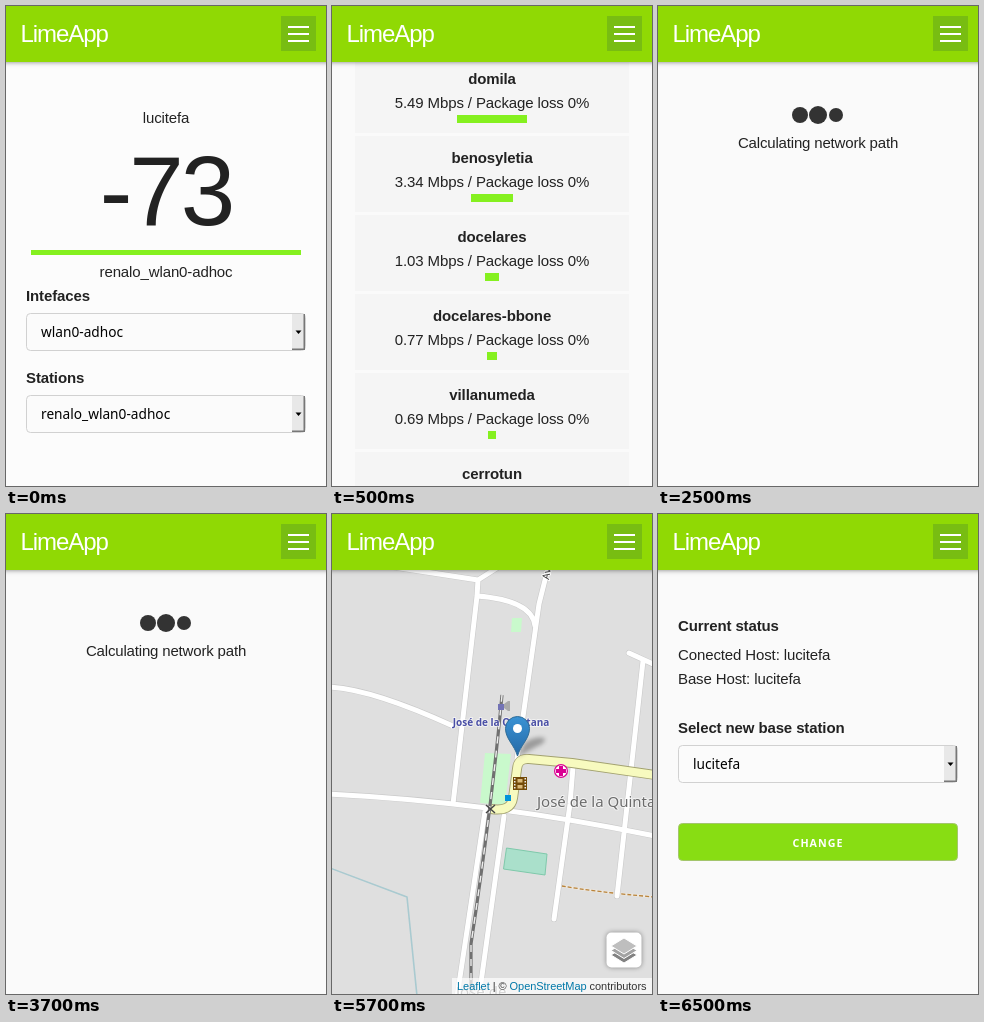
Animation, 320 px wide and 480 px high, one loop 8000 ms. Source, as an HTML page with a canvas:

```html
<!DOCTYPE html>
<html lang="en">
<head>
<meta charset="utf-8">
<title>LimeApp</title>
<style>
html, body { margin: 0; width: 100%; height: 100%; overflow: hidden; background: #fafafa; }
canvas { display: block; width: 320px; height: 480px; }
</style>
</head>
<body>
<canvas id="stage"></canvas>
<script>
const W = 320, H = 480, LOOP = 8000, MID = W / 2;
const SANS = '"Liberation Sans", Arial, sans-serif';
const NOTO = '"Noto Sans", "Open Sans", sans-serif';
const LIME = '#90d904', BAR = '#85f01f', INK = '#222', PINK = '#da0092';
const HOST = 'lucitefa', STATION = 'renalo_wlan0-adhoc';

const canvas = document.getElementById('stage');
const ctx = canvas.getContext('2d');
const dpr = window.devicePixelRatio || 1;
canvas.width = W * dpr;
canvas.height = H * dpr;

function rect(x, y, w, h, fill) {
  ctx.fillStyle = fill;
  ctx.fillRect(x, y, w, h);
}

function disc(x, y, r, fill) {
  ctx.fillStyle = fill;
  ctx.beginPath();
  ctx.arc(x, y, r, 0, 7);
  ctx.fill();
}

function fill(d, color, border) {
  const path = new Path2D(d);
  ctx.fillStyle = color;
  ctx.fill(path);
  if (border) stroke(d, 1, border);
}

function stroke(d, width, color, dash = []) {
  ctx.lineWidth = width;
  ctx.strokeStyle = color;
  ctx.lineJoin = 'round';
  ctx.setLineDash(dash);
  ctx.stroke(new Path2D(d));
  ctx.setLineDash([]);
}

function box(x, y, w, h, r, color, border) {
  ctx.beginPath();
  ctx.roundRect(x + .5, y + .5, w - 1, h - 1, r);
  ctx.fillStyle = color;
  ctx.fill();
  if (border) {
    ctx.lineWidth = 1;
    ctx.strokeStyle = border;
    ctx.stroke();
  }
}

function text(str, x, y, { font = '15px ' + SANS, color = INK, align = 'left', gap = -.12, halo } = {}) {
  ctx.font = font;
  ctx.textAlign = align;
  ctx.letterSpacing = gap + 'px';
  if (halo) {
    ctx.lineWidth = 2;
    ctx.lineJoin = 'round';
    ctx.strokeStyle = halo;
    ctx.strokeText(str, x, y);
  }
  ctx.fillStyle = color;
  ctx.fillText(str, x, y);
  return ctx.measureText(str).width;
}

const center = (str, y, style) => text(str, MID, y, { align: 'center', ...style });
const bold = { font: 'bold 15px ' + SANS };

function shadowed(color, blur, draw) {
  ctx.save();
  ctx.shadowColor = color;
  ctx.shadowBlur = blur * dpr;
  draw();
  ctx.restore();
}

function header() {
  shadowed('rgba(0,0,0,.5)', 5, () => rect(-10, -10, W + 20, 66, LIME));
  text('LimeApp', 14.6, 36, { font: '24px ' + SANS, color: '#fff', gap: -1.1 });
  rect(275, 10, 35, 35, '#78bd12');
  for (let i = 0; i < 3; i++) rect(282, 20 + i * 7, 21, 2, '#fff');
}

function select(y, value) {
  box(20, y, 280, 38, 4, '#fbfbfb', '#d1d1d1');
  text(value, 35, y + 24, { font: '13.7px ' + NOTO, color: '#000', gap: 0 });
  rect(286, y + 1, 13, 36, '#777');
  rect(286, y + 1, 11.5, 34.5, '#e8e8e8');
  fill(`M289.5 ${y + 17.5}h6l-3 3.5z`, '#000');
}

function signal() {
  rect(0, 0, W, H, '#fcfcfc');
  center(HOST, 117);
  center('-73', 219, { font: '98px ' + SANS, gap: -3 });
  rect(25, 244, 270, 5, BAR);
  center(STATION, 271);
  text('Intefaces', 20, 295, bold);
  select(307, 'wlan0-adhoc');
  text('Stations', 20, 377, bold);
  select(389, STATION);
}

const speeds = {
  domila: 5.49, benosyletia: 3.34, docelares: 1.03,
  'docelares-bbone': .77, villanumeda: .69, cerrotun: .6
};

function metrics() {
  rect(0, 0, W, H, '#fafafa');
  Object.entries(speeds).forEach(([name, mbps], i) => {
    const y = 51 + i * 79, half = Math.round(mbps * 6.4);
    rect(23, y, 274, 76, '#f5f5f5');
    center(name, y + 27, bold);
    center(mbps.toFixed(2) + ' Mbps / Package loss 0%', y + 51);
    rect(MID - half, y + 58, half * 2, 8, BAR);
  });
}

function loading() {
  rect(0, 0, W, H, '#fafafa');
  [8, 9, 7].forEach((r, i) => disc(142 + i * 18, 109, r, '#333'));
  center('Calculating network path', 142, { gap: -.17 });
}

const streets =
  'M55 52L146 66L168 52 M146 66L145 82L121 290 M145 82Q200 86 203 112 ' +
  'M217 50L207 90L185 245 M-3 173Q40 175 121 212 M-3 280Q160 288 323 322 ' +
  'M297 139L323 151 M311 147L303 220L285 382 M241 253L238 290L222 405 ' +
  'M172 302L147 483 M153 297L125 483';
const avenue = 'M323 261L240 249L197 245Q186 244 185 255L181 284Q179 298 159 295';
const rail = 'M170 181Q160 290 139 430V482';
const track = 'M230 372Q265 378 322 383';

function pin(x, y) {
  ctx.save();
  ctx.translate(x, y);
  ctx.save();
  ctx.transform(1, 0, -.7, .6, 0, 0);
  ctx.filter = 'blur(2px)';
  fill('M0 0L-7 -18A9 9 0 1 1 7 -18z', 'rgba(0,0,0,.3)');
  ctx.restore();
  const blue = ctx.createLinearGradient(0, -41, 0, 0);
  blue.addColorStop(0, '#3a93d5');
  blue.addColorStop(1, '#2468a5');
  fill('M0 -1C-3 -12 -12 -18 -12 -28.5A12 12 0 0 1 12 -28.5C12 -18 3 -12 0 -1z', blue, '#2e6c97');
  disc(0, -28.5, 4.5, '#fff');
  ctx.restore();
}

function mapIcons() {
  rect(166, 190, 6, 6, '#7373b5');
  fill('M172 190l4 -3h2v10h-2l-4 -3z', '#aaa');
  rect(173, 281, 6, 6, '#0092da');
  stroke('M154 291l9 8m-9 0l9 -8', 1.5, '#444');

  disc(229, 257, 7, PINK);
  disc(229, 257, 5.8, '#fff');
  rect(227, 252, 4, 10, PINK);
  rect(224, 255, 10, 4, PINK);

  rect(181, 263, 14, 13, '#734a08');
  for (let y = 264; y < 275; y += 3) {
    rect(182, y, 1.5, 1.5, '#eee');
    rect(192.5, y, 1.5, 1.5, '#eee');
  }
  for (const y of [265, 271]) rect(185.5, y, 5, 3.5, '#d9b878');
}

function layersControl() {
  shadowed('rgba(0,0,0,.4)', 5, () => box(274, 418, 36, 36, 5, '#fff'));
  ['#828282', '#a2a2a2', '#bebebe'].forEach((shade, i) =>
    fill(`M292 ${433 - i * 4.5}l13 8l-13 8l-13 -8z`, shade, '#fff'));
}

function attribution() {
  rect(120, 464, 200, 16, 'rgba(255,255,255,.7)');
  let x = 125;
  ['Leaflet', ' | © ', 'OpenStreetMap', ' contributors'].forEach((str, i) => {
    x += text(str, x, 476, { font: '11px ' + SANS, color: i % 2 ? '#333' : '#0078a8', gap: -.05 });
  });
}

function map() {
  rect(0, 0, W, H, '#dfdfdf');
  stroke('M-2 354L75 383L85 482', 1.6, '#a9cad0');
  fill('M153 239L179 240L173 291L148 289z', '#c9f9cc');
  fill('M180 104h10l-1 14h-10z', '#c9f9cc');
  fill('M174.5 334l40.5 6l-2 21l-41.5 -6z', '#aae0cb', '#7fc9ab');
  stroke(track, 2.5, '#ece7df');
  stroke(track, 1.3, '#b9833a', [4, 2]);

  ctx.lineCap = 'round';
  stroke(streets, 6.2, '#cacaca');
  stroke(streets, 5, '#fff');
  ctx.lineCap = 'butt';
  stroke(avenue, 10, '#a3a270');
  stroke(avenue, 8.2, '#f7fabf');
  stroke(rail, 3.2, '#707070');
  stroke(rail, 1.4, '#eee', [7, 7]);

  ctx.save();
  ctx.translate(217, 66);
  ctx.rotate(-1.4);
  text('Av', 0, 0, { font: '10px ' + NOTO, color: '#333', halo: '#fff' });
  ctx.restore();

  mapIcons();
  const town = 'José de la Quintana', haze = 'rgba(255,255,255,.6)';
  const place = { font: '15px ' + NOTO, color: '#6b6b6b', halo: haze, gap: 0 };
  text(town, 169, 212, { font: 'bold 10px ' + NOTO, color: '#4a4fa6', align: 'center', halo: haze, gap: 0 });
  text(town, 205, 293, place);
  text('José de', 124, 483, place);

  pin(185.5, 243);
  layersControl();
  attribution();
}

function settings() {
  rect(0, 0, W, H, '#fafafa');
  text('Current status', 20, 117, bold);
  text('Conected Host: ' + HOST, 20, 146);
  text('Base Host: ' + HOST, 20, 170);
  text('Select new base station', 20, 219, bold);
  select(231, HOST);
  box(20, 309, 280, 38, 4, '#88dd13', '#a3c56c');
  center('CHANGE', 332.5, { font: '600 10.7px ' + NOTO, color: '#fff', gap: 1 });
}

const scenes = [signal, metrics, loading, map, settings];

function frame(now) {
  // The first scene is cut to 500 ms; the rest follow every 2 s.
  const index = Math.floor((now % LOOP + 1500) / 2000);
  ctx.setTransform(dpr, 0, 0, dpr, 0, 0);
  scenes[index]();
  header();
  requestAnimationFrame(frame);
}

frame(0);
</script>
</body>
</html>
```
